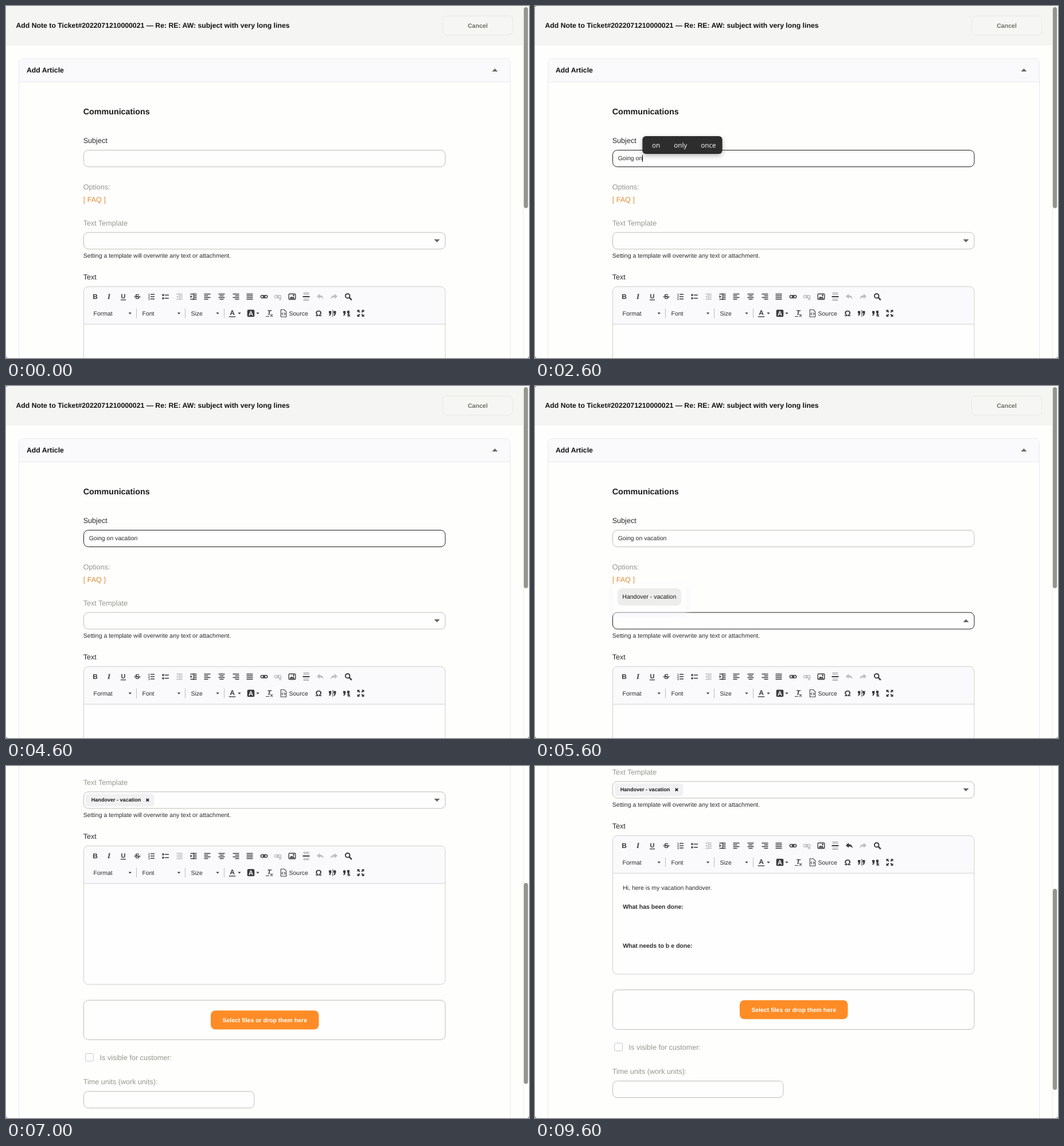
An HTML page that plays this animation: 912x614 px, repeating every 9800 ms.

```html
<!DOCTYPE html>
<html lang="en">
<head>
<meta charset="utf-8">
<title>Add note form</title>
<style>
  html, body { margin: 0; width: 100%; height: 100%; overflow: hidden; background: #fefefd; }
  svg { display: block; width: 912px; height: 614px; }
  text { font-family: "Liberation Sans", Arial, sans-serif; font-size: 10.5px; fill: #2b2b2b; white-space: pre; text-rendering: geometricPrecision; }
  .b { font-weight: bold; }
  .label { font-size: 12.6px; }
  .dim { fill: #96968f; }
  .head { font-size: 12.25px; font-weight: bold; fill: #111; }
  .field { fill: #fefefe; stroke: #bdbdb7; }
  .focus { stroke: #1c1c1c; }
  #popup text { font: 11.7px "Open Sans", "Noto Sans", sans-serif; fill: #fff; }
  #popup { filter: drop-shadow(0 3px 4px rgba(0, 0, 0, .28)); }
</style>
</head>
<body>
<svg id="stage" viewBox="0 0 912 614" xmlns="http://www.w3.org/2000/svg"></svg>
<script>
const LOOP = 9800, STEP = 200, DARK = '#3c3c3c', PALE = '#bfbfbf';
const SUBJECT = 'Going on vacation', SUBJECT_X = 144.7;

const text = (x, y, s, cls = '', more = '') => `<text x="${x}" y="${y}" class="${cls}" ${more}>${s}</text>`;
const rect = (x, y, w, h, r, more) => `<rect x="${x}" y="${y}" width="${w}" height="${h}" rx="${r}" ${more}/>`;
const field = (y, w, h, id = '') => rect(135.5, y, w, h, 8, `class="field" ${id && `id="${id}"`}`);
const path = (d, more = '') => `<path d="${d}" ${more}/>`;
const fill = d => path(d, 'fill="currentColor" stroke="none"');
const icon = (x, y, body, color = DARK, id = '') =>
  `<g transform="translate(${x} ${y})" color="${color}" stroke="currentColor" fill="none" stroke-width="1.4" ${id && `id="${id}"`}>${body}</g>`;
const glyph = (s, style, y = 4.3) =>
  `<text x="0" y="${y}" text-anchor="middle" stroke="none" style="fill:currentColor;font-weight:bold;font-size:12px;${style}">${s}</text>`;

// Horizontal strokes as [x, y, width]
const strokes = list => path(list.map(([x, y, w]) => `M${x} ${y}h${w}`).join(''));
const aligned = (shift, short = 7) => strokes([-4.5, -1.5, 1.5, 4.5].map((y, i) => {
  const w = i % 2 ? short : 11;
  return [-5.5 + (11 - w) * shift, y, w];
}));
const indent = dir => strokes([[-5.5, -4.5, 11], [0, -1.5, 5.5], [0, 1.5, 5.5], [-5.5, 4.5, 11]]) +
  path('M0 -6v12', 'stroke-width="1"') + fill(dir > 0 ? 'M-5.5 -2.5L-2 0L-5.5 2.5z' : 'M-2 -2.5L-5.5 0L-2 2.5z');
const chain = rect(-5.8, -2.3, 6.6, 4.6, 2.3, '') + rect(-.8, -2.3, 6.6, 4.6, 2.3, '') + path('M-2.5 0h5');
const curvedArrow = dir => `<g transform="scale(${dir} 1)">${fill('M-6.2 -.6L-1 -5V-2.5C3.5 -2.3 5.5 .3 6 4.6C4.2 1.9 2.3 1.2 -1 1.3V3.8z')}</g>`;
const quote = fill('M-6 -4h4.2v4.2l-2 4h-2l1.4 -4h-1.6z');
const caretDown = (x, y) => path(`M${x - 2.7} ${y - 1.2}h5.4l-2.7 3z`, `fill="${DARK}"`);

function toolbar() {
  const y = 507, z = 536;
  const rowOne = [
    [155.5, glyph('B', '')],
    [179.5, glyph('I', 'font-family:Liberation Serif,serif;font-style:italic;font-size:13px')],
    [204.5, glyph('U', 'font-size:11px', 3.3) + strokes([[-4.5, 5.6, 9]])],
    [229, glyph('S', '') + strokes([[-5.5, .3, 11]])],
    [253.5, strokes([[-1.5, -4, 7], [-1.5, 0, 7], [-1.5, 4, 7]]) +
      ['1', '2', '3'].map((n, i) => `<g transform="translate(-4.2 ${i * 4.2 - 4.2})">${glyph(n, 'font-size:5px', 1.8)}</g>`).join('')],
    [278, strokes([[-1, -2.8, 7], [-1, 2.8, 7]]) + '<circle cx="-4" cy="-2.8" r="1.2"/><circle cx="-4" cy="2.8" r="1.2"/>'],
    [302.5, indent(-1), PALE],
    [327, indent(1)],
    [351, aligned(0)],
    [376, aligned(.5)],
    [401, aligned(1)],
    [425, aligned(0, 11)],
    [450, chain],
    [474, chain + path('M2 2l4 4M6 2l-4 4'), PALE],
    [499, rect(-5.8, -4.8, 11.6, 9.6, 1, '') + fill('M-4.8 3.6L-1.6 -.6L.4 1.6L2 0L4.8 3.6z') + '<circle cx="2.5" cy="-2" r=".7"/>'],
    [523.5, path('M-6 0h12', 'stroke-width="2"') + path('M-5 -6.5h10M-5 -4h10M-5 4h10M-5 6.5h10', 'stroke-width="1" opacity=".55"')],
    [548, curvedArrow(1), PALE, 'undo'],
    [572, curvedArrow(-1), PALE],
    [597, '<circle cx="-1.3" cy="-1.3" r="3.8" stroke-width="2"/>' + path('M1.7 1.7L5.8 5.8', 'stroke-width="2.6"')],
  ].map(([x, ...rest]) => icon(x, y, ...rest)).join('');
  const menus = [[152.5, 'Format', 216.3], [237.5, 'Font', 301.5], [322.5, 'Size', 369]]
    .map(([x, s, a]) => text(x, z + 3.5, s) + caretDown(a, z)).join('');
  const dividers = path('M227.5 527.5v17M312.5 527.5v17M380.5 527.5v17', 'stroke="#bcbcbc"');
  const rowTwo = [
    [394.5, glyph('A', '', 3.3) + strokes([[-5.8, 6, 11.6]])],
    [427, rect(-6.3, -6.3, 12.6, 12.6, 2, 'fill="currentColor" stroke="none"') + glyph('A', 'fill:#fff;font-size:11px', 4)],
    [459, glyph('T', 'font-style:italic', 3.4) + path('M2 2l4 4M6 2l-4 4M-6 5.5h6', 'stroke-width="1.2"')],
    [484, path('M-4.7 -6.2h6l3.4 3.4v9h-9.4z', 'stroke-width="1.1"') + path('M-1 -1.2l-2 2.2l2 2.2M1 -1.2l2 2.2l-2 2.2', 'stroke-width="1.1"')],
    [545, glyph('Ω', 'font-size:14px', 5)],
    [569, quote + `<g transform="translate(8.2 0)">${quote}</g>` + path('M.9 -6v12', 'stroke-width="1"')],
    [594, quote + `<g transform="translate(6.8 -.5)">${quote}</g>` + path('M2 2l4 4M6 2l-4 4', 'stroke-width="1.2"')],
    [618.5, [0, 90, 180, 270].map(a => `<g transform="rotate(${a})">${fill('M-6 -6h4.6l-1.5 1.5l2 2l-1.6 1.6l-2 -2l-1.5 1.5z')}</g>`).join('')],
  ].map(([x, ...rest]) => icon(x, z, ...rest)).join('');
  return rowOne + menus + dividers + rowTwo + caretDown(407, z) + caretDown(439, z) + text(493.5, z + 3.5, 'Source');
}

const page = `
  ${rect(0, 0, 902, 69, 0, 'fill="#f5f5f3"')}
  ${text(17.5, 38.3, 'Add Note to Ticket#2022071210000021 — Re: RE: AW: subject with very long lines', 'head')}
  ${rect(761.5, 17.5, 122, 33, 7, 'fill="#f6f6f4" stroke="#e8e8e5"')}
  ${text(822.5, 37.8, 'Cancel', 'b', 'text-anchor="middle" style="fill:#6d6d67;font-size:10.6px"')}
  ${path('M22.5 1100V98.5a7 7 0 0 1 7 -7H872.5a7 7 0 0 1 7 7V1100', 'fill="#fefefd" stroke="#e9e9ee"')}
  ${path('M23 132.5V98.5a6.5 6.5 0 0 1 6.5 -6.5H872.5a6.5 6.5 0 0 1 6.5 6.5V132.5z', 'fill="#fafafd"')}
  ${path('M23 132.5H879', 'stroke="#e9e9ee"')}
  ${text(36, 115.8, 'Add Article', 'head')}
  ${path('M847.5 114.3h10l-5 -5.3z', 'fill="#66665f"')}
  ${text(134.7, 188.6, 'Communications', 'b', 'style="font-size:14.3px;fill:#1a1a1a"')}
  ${text(134.7, 238.8, 'Subject', 'label')}
  ${field(251.5, 630.5, 29, 'subject')}
  <text id="typed" x="${SUBJECT_X}" y="269.3"></text>
  ${rect(0, 260, 1, 12, 0, 'id="caret" fill="#000"')}
  ${text(134.7, 319.5, 'Options:', 'label dim')}
  ${text(134.7, 342.3, '[ FAQ ]', 'label', 'style="fill:#e08e35"')}
  ${text(134.7, 382.5, 'Text Template', 'label dim')}
  ${field(395, 630.5, 29, 'template')}
  ${path('M746.5 407h10l-5 5.3z', 'id="arrow" fill="#66665f"')}
  <g id="tag">
    ${rect(139, 398.5, 119.5, 22, 5, 'fill="#f1f1f4"')}
    ${text(148.8, 412.3, 'Handover - vacation', 'b', 'style="font-size:9.05px;fill:#1a1a1a"')}
    ${path('M244.6 407.1l4.6 4.6M249.2 407.1l-4.6 4.6', 'stroke="#222" stroke-width="1.8"')}
  </g>
  ${text(134.8, 438.6, 'Setting a template will overwrite any text or attachment.')}
  ${text(134.7, 476.5, 'Text', 'label')}
  ${rect(135.5, 489.5, 630.5, 241.5, 8, 'fill="#fefefe"')}
  ${path('M136 555V497a7.5 7.5 0 0 1 7.5 -7.5H758a7.5 7.5 0 0 1 7.5 7.5V555z', 'fill="#fafafd"')}
  ${path('M136 555H766', 'stroke="#d0d0d0"')}
  ${rect(135.5, 489.5, 630.5, 241.5, 8, 'fill="none" stroke="#cfcfce"')}
  ${toolbar()}
  <g id="letter">
    ${text(153.2, 583.6, 'Hi, here is my vacation handover.')}
    ${text(153.2, 617, 'What has been done:', 'b')}
    ${text(153.2, 684.6, 'What needs to b e done:', 'b')}
  </g>
  ${rect(153, 574, 1, 12, 0, 'id="bodyCaret" fill="#000"')}
  ${field(758.5, 630.5, 69, '')}
  ${rect(357, 776.5, 188.5, 33, 8, 'fill="#ff8c26"')}
  ${text(451.2, 796.5, 'Select files or drop them here', 'b', 'text-anchor="middle" style="fill:#fff"')}
  ${rect(138.5, 851.5, 14, 13.5, 2, 'fill="#fefefe" stroke="#c8c8c4"')}
  ${text(163.6, 862.5, 'Is visible for customer:', 'label dim')}
  ${text(134.7, 904.5, 'Time units (work units):', 'label dim')}
  ${field(917.5, 297.5, 29)}
  <g id="menu">
    ${rect(131, 346, 137, 56, 10, 'fill="#f4f4fc" opacity=".55" filter="url(#soft)"')}
    ${rect(135, 345, 129, 49, 6, 'fill="#fefefd"')}
    ${rect(144, 353, 111, 30, 8, 'id="option" fill="#ededec"')}
    ${text(152.3, 371.3, 'Handover - vacation', '', 'style="fill:#1a1a1a"')}
  </g>
  <g id="popup"></g>`;

document.getElementById('stage').innerHTML = `
  <defs><filter id="soft" x="-20%" y="-40%" width="140%" height="180%"><feGaussianBlur stdDeviation="4"/></filter></defs>
  ${rect(0, 0, 912, 614, 0, 'fill="#fefefd"')}
  <g id="page">${page}</g>
  ${path('M902.5 0V614', 'stroke="#ececea"')}
  ${rect(903, 2, 7.3, 350.5, 3.6, 'id="thumb" fill="#95958f"')}
  <g id="status">
    ${path('M0 596H297a4 4 0 0 1 4 4V614H0z', 'fill="#e4e4e4"')}
    ${text(6, 608.5, 'https://helpdesk.example.com/desk/index.pl?Action=Note…', '', 'style="fill:#fff"')}
  </g>
  ${path('M0 611q.4 2.6 3 3h-3zM912 611q-.4 2.6 -3 3h3z', 'fill="#707070"')}
  ${rect(0, 0, 2, 1, 0, 'id="corner" fill="#555"')}`;

const $ = id => document.getElementById(id);
const show = (id, on) => $(id).style.display = on ? '' : 'none';

// Last entry whose time has come
const at = (list, t) => list.reduce((found, row) => row[0] <= t ? row : found, list[0]);

const typing = [[0, 0], [1400, 1], [1600, 2], [1800, 3], [2000, 5], [2200, 6], [2400, 8],
  [2800, 9], [3000, 11], [3200, 12], [3400, 14], [3600, 15], [3800, 16], [4000, 17]];
// Suggestions: time, letters typed at the anchor, words
const hints = [[0, 0, ''], [1400, 1, 'Good,Get,Great'], [1800, 3, 'Going,Going to,Going through'], [2400, 0, ''],
  [2600, 8, 'on,only,once'], [2800, 9, 'vacation,the,a'], [3000, 11, 'vacation,value,various'],
  [3200, 12, 'vacation,vacations,*'], [3600, 0, ''], [3800, 16, 'vacation,vacations,vacationing'],
  [4000, 17, 'vacation,vacations,vacationing'], [4200, 0, '']];
const scrolls = [[0, 0], [6800, 190], [7000, 350], [7200, 368]];

function widthOf(n) {
  $('typed').textContent = SUBJECT.slice(0, n);
  return n ? $('typed').getComputedTextLength() : 0;
}

function drawPopup(left, words) {
  const box = $('popup');
  box.innerHTML = '';
  if (!words) return;
  box.innerHTML = rect(left, 227, 10, 31, 6, 'fill="#2d2d2d"');
  let x = left + 16.6;
  for (const word of words.split(',')) {
    if (word === '*') {
      box.insertAdjacentHTML('beforeend', `<g transform="translate(${x + 7.5} 244) rotate(-45)">
        ${rect(-6, -2.6, 12, 5.2, 2, 'fill="#4aa3e0"')}${rect(-3, -1.6, 7, 2, 1, 'fill="#b5e0fa"')}</g>`);
      x += 17 + 24;
    } else {
      box.insertAdjacentHTML('beforeend', text(x, 247.4, word));
      x += box.lastElementChild.getComputedTextLength() + 24;
    }
  }
  box.firstElementChild.setAttribute('width', x - 24 + 11 - left);
}

function draw(t) {
  const writing = t >= 800 && t < 5000, open = t >= 5200 && t < 6200, picked = t >= 6200;
  const [, letters, words] = at(hints, t);
  drawPopup(SUBJECT_X + widthOf(letters), words);
  $('caret').setAttribute('x', Math.round(SUBJECT_X + widthOf(at(typing, t)[1]) - .4));
  show('caret', writing && t < 4600);
  $('subject').classList.toggle('focus', writing);
  $('template').classList.toggle('focus', t >= 5000 && !picked);
  $('arrow').setAttribute('transform', open ? 'rotate(180 751.5 409.5)' : '');
  show('menu', open);
  show('option', t >= 5400);
  show('tag', picked);
  show('letter', t >= 8200);
  show('bodyCaret', t === 9400);
  $('undo').setAttribute('color', t >= 8200 ? DARK : PALE);
  $('status').setAttribute('opacity', t < 6000 || t > 6600 ? 0 : t < 6400 ? .9 : t < 6600 ? .6 : .3);
  const y = at(scrolls, t)[1];
  $('page').setAttribute('transform', `translate(0 ${-y})`);
  $('thumb').setAttribute('y', 2 + y * .577);
  show('corner', t >= 200 && t < 6800);
}

let last = -1;
function tick(now) {
  const t = Math.floor(now % LOOP / STEP) * STEP;
  if (t !== last) draw(last = t);
  requestAnimationFrame(tick);
}
draw(0);
requestAnimationFrame(tick);
</script>
</body>
</html>
```
